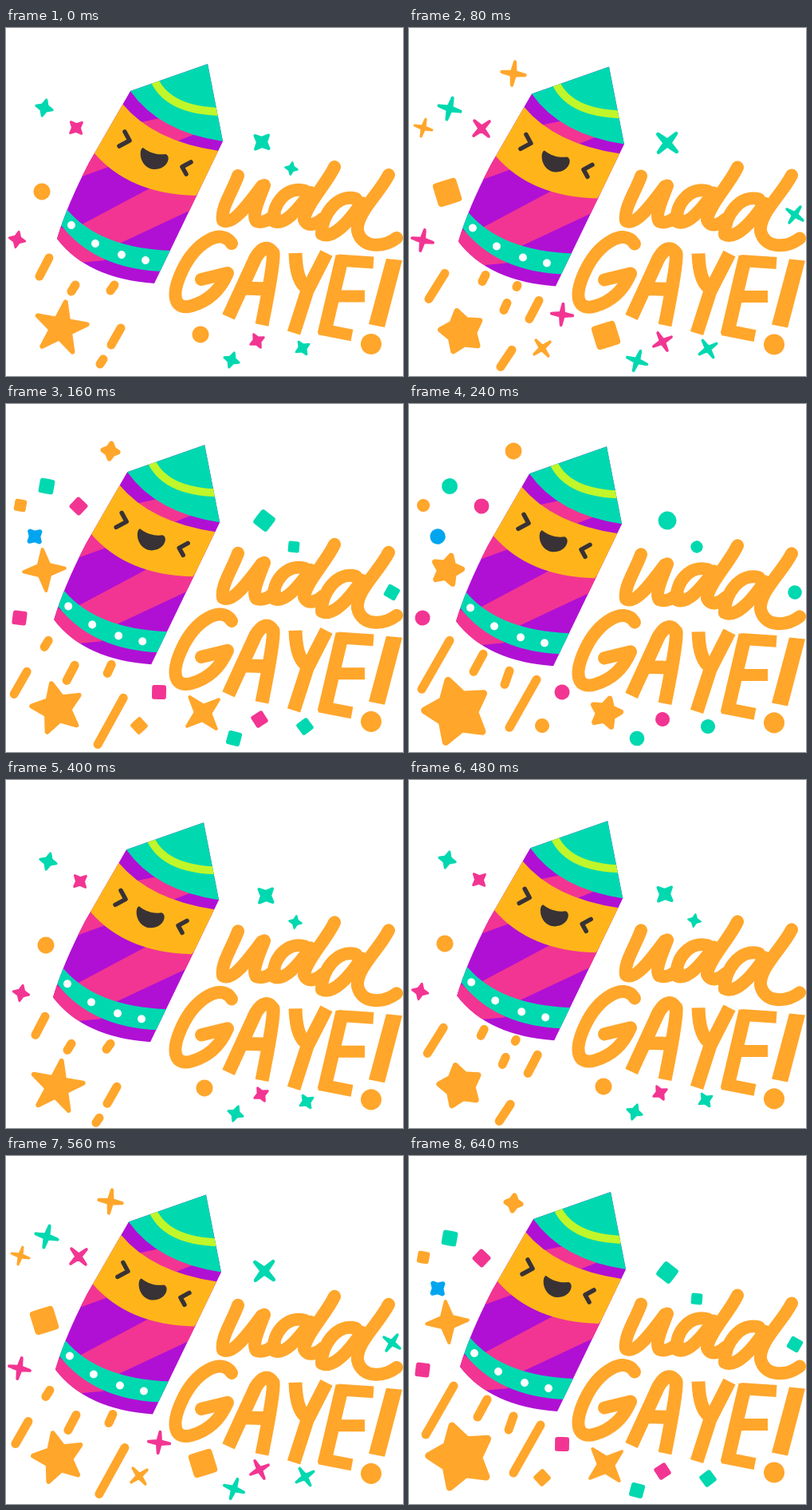
Animation, 498 px wide and 436 px high, one loop 0.72 s. Source, as an HTML page with a canvas:

```html
<!DOCTYPE html>
<html lang="en">
<head>
<meta charset="utf-8">
<title>udd GAYE!</title>
<style>
html, body { margin: 0; width: 100%; height: 100%; overflow: hidden; background: #fff; }
canvas { display: block; }
</style>
</head>
<body>
<canvas id="stage" width="498" height="436" role="img" aria-label="udd GAYE!"></canvas>
<script>
const ctx = document.getElementById('stage').getContext('2d');
const ORANGE = '#ffa62b', TEAL = '#00d8b0', PINK = '#f23592', PURPLE = '#b010d4';
const YELLOW = '#ffb51a', LIME = '#c0f62a', DARK = '#383236', BLUE = '#00a5f0';
const STEP = 80, STEPS = 9;

function fill(d, color) {
  ctx.fillStyle = color;
  ctx.fill(new Path2D(d));
}

function stroke(d, color, width, cap = 'round') {
  ctx.strokeStyle = color;
  ctx.lineWidth = width;
  ctx.lineCap = cap;
  ctx.lineJoin = 'round';
  ctx.stroke(new Path2D(d));
}

// Star with n points; soft is the width of the rounding outline.
function star(x, y, color, n, radius, ratio, turn, soft) {
  const r = Math.max(radius - soft / 2, 0.5);
  let d = '';
  for (let i = 0; i < 2 * n; i++) {
    const a = turn * Math.PI / 180 + i * Math.PI / n;
    const q = i % 2 ? r * ratio : r;
    d += (i ? 'L' : 'M') + (x + q * Math.cos(a)) + ' ' + (y + q * Math.sin(a));
  }
  fill(d + 'Z', color);
  stroke(d + 'Z', color, soft);
}

const dot = (x, y, r, color) => star(x, y, color, 4, r, 1, 0, 2 * r - 1);

// Streaks and star trailing the rocket, a cycle of five poses.
const streaks = [
  'M54 288L42 311M87 322L82 330M136 322L131 329M144 376L132 397M122 415L118 421',
  'M47 304L27 336M98 306L94 314M138 319L137 321M125 341L121 350M165 338L153 361M131 400L117 421',
  'M57 290L52 298M30 329L14 357M90 321L80 340M136 320L131 331M151 362L119 420',
  'M56 288L21 349M98 305L86 327M131 326L125 343M165 337L131 397',
  'M56 287L32 328M91 317L83 331M134 322L128 335M154 356L133 393M124 410L119 418'
];
const trailStars = [
  [69, 376, 36, .38, -80, 6],
  [68, 377, 30, .6, -103, 7],
  [68, 375, 35, .48, -103, 6],
  [65, 377, 45, .56, -106, 9],
  [66, 377, 40, .47, -95, 7]
];

function drawTrail(pose) {
  stroke(streaks[pose], ORANGE, 11);
  const [x, y, r, ratio, turn, soft] = trailStars[pose];
  star(x, y, ORANGE, 5, r, ratio, turn, soft);
}

function drawRocket() {
  ctx.save();
  ctx.clip(new Path2D('M253 45L272 142L186 320Q102 314 64 264Q76 223 104 169L156 79Z'));
  fill('M40 40H290V330H40Z', PURPLE);
  fill('M104 150L137 171L90 188Z', PINK);
  fill('M182 200L250 203L232 228L138 272L86 251Z', PINK);
  fill('M50 235L125 291L92 294L60 280Z', PINK);
  fill('M164 119L203 111L242 131L204 146Z', PINK);
  fill('M146 95Q185 142 267 154L280 160L238 210Q155 208 111 157L100 140Z', YELLOW);
  fill('M156 79Q192 130 272 142L290 40H140Z', TEAL);
  stroke('M184 60Q200 105 275 105', LIME, 10, 'butt');
  fill('M70 219L77 228Q118 276 208 279L220 279L206 305H196Q112 302 69 247L60 236Z', TEAL);
  ctx.restore();

  [[82, 247], [112, 270], [145, 284], [175, 291]].forEach(([x, y]) => dot(x, y, 5, '#fff'));
  stroke('M149 130L155 141L142 148M232 168L221 174L226 183', DARK, 5.5);
  fill('M172 150C182 158 192 159 200 158C208 160 203 178 185 177C167 175 166 151 172 150Z', DARK);
}

function drawWords() {
  // udd
  stroke('M291 185C284 205 269 226 272 241C284 248 304 221 321 198' +
    'M324 197C317 216 308 234 314 242C322 245 331 240 337 234' +
    'M375 204C352 197 333 222 336 242C349 248 366 228 382 206' +
    'M412 174C403 194 376 222 374 240C378 250 390 246 397 239' +
    'M439 214C416 207 396 234 396 258C410 265 430 243 446 219' +
    'M480 184C468 208 439 232 441 254C446 277 474 275 490 263', ORANGE, 16);
  // GAYE!
  stroke('M283 270C270 249 237 270 221 304C205 338 213 354 233 348' +
    'C254 342 269 328 278 307L245 315', ORANGE, 16);
  stroke('M279 362L313 288Q325 268 335 282Q337 292 321 372M300 326L328 327' +
    'M363 282Q364 318 378 326M402 282L378 329L361 382M422 286L399 384', ORANGE, 17, 'butt');
  stroke('M416 291L461 294M410 336L450 336M393 377L434 385', ORANGE, 15, 'butt');
  fill('M477 289L497 291L475 375L455 371Z', ORANGE);
  dot(458, 396, 13, ORANGE);
}

// x, y, colour, size, turn, poses in which it shows
const sparks = [
  [51, 102, TEAL, 10, 15, '012345'],
  [91, 127, PINK, 9.5, 48, '012345'],
  [17, 267, PINK, 9.5, 12, '012345'],
  [324, 145, TEAL, 11.5, 43, '012345'],
  [361, 178, TEAL, 7.5, 10, '02345'],
  [318, 394, PINK, 9, 62, '012345'],
  [286, 418, TEAL, 9.3, 20, '012345'],
  [375, 403, TEAL, 9, 58, '012345'],
  [484, 235, TEAL, 8.7, 35, '1234'],
  [131, 58, ORANGE, 10.5, 8, '1234'],
  [18, 126, ORANGE, 8, 15, '1234'],
  [192, 360, PINK, 9.5, 6, '1234'],
  [167, 402, ORANGE, 9, 52, '1234'],
  [36, 165, BLUE, 9.7, 48, '234']
];
// scale, inner ratio, rounding share of the size
const sparkPoses = [
  [1.2, .45, .3], [1.6, .2, .4], [1.2, .71, .6], [1, 1, 1.9], [.7, 1, 1.3], [1.2, .45, .3]
];
const sparkShift = [[-3, -2], [0, -1], [0, 1], [0, 1], [1, 1], [2, 0]];
// points, radius, inner ratio, turn, rounding
const bigPoses = [
  [8, 10.5, 1, 0, 18], [4, 20, .71, 28, 8], [4, 28, .36, 0, 4],
  [5, 22, .52, -75, 7], [5, 16, .65, -75, 9], [8, 10.5, 1, 0, 18]
];

function drawSparks(pose) {
  const [dx, dy] = sparkShift[pose];
  const [scale, ratio, soft] = sparkPoses[pose];
  for (const [x, y, color, size, turn, shown] of sparks) {
    if (!shown.includes(pose)) continue;
    const pinched = pose === 2 && (color === BLUE || y < 60);
    const square = pose === 2 ? 40 : 0;
    star(x + dx, y + dy, color, 4, size * scale, pinched ? .5 : ratio,
      turn + (pinched ? 0 : square), size * soft);
  }
  const [n, r, inner, turn, round] = bigPoses[pose];
  star(48 + dx, 207 + dy, ORANGE, n, r, inner, turn + (pose === 2 ? -5 : 0), round);
  star(247 + dx, 386 + dy, ORANGE, n, r, inner, turn + (pose === 2 ? -40 : 0), round);
}

function shifted(dx, dy, draw) {
  ctx.save();
  ctx.translate(dx, dy);
  draw();
  ctx.restore();
}

function frame(now) {
  const i = Math.floor(now / STEP) % STEPS;
  const sink = 9 * Math.sin(Math.PI * i / 8);
  ctx.fillStyle = '#fff';
  ctx.fillRect(0, 0, 498, 436);
  drawSparks(i % 6);
  shifted(-.6 * sink, sink, () => {
    drawTrail(i % 5);
    drawRocket();
  });
  shifted(0, 4.5 * Math.sin(Math.PI * i / 9) ** 2, drawWords);
}

const start = performance.now();
function loop() {
  frame(performance.now() - start);
  requestAnimationFrame(loop);
}
loop();
</script>
</body>
</html>
```
